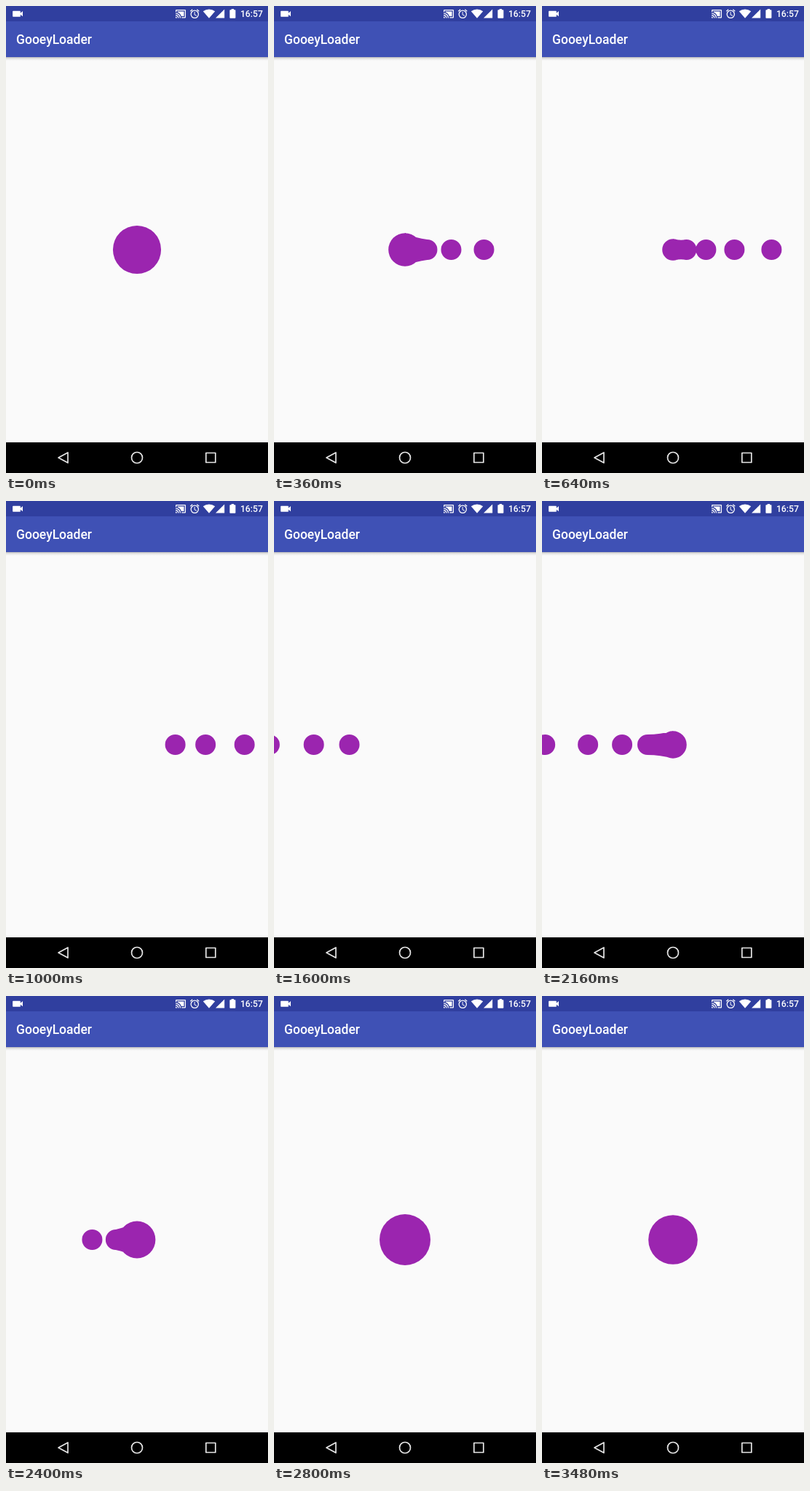
An HTML page that plays this animation: 360x640 px, repeating every 3.52 s.

```html
<!DOCTYPE html>
<html lang="en">
<head>
<meta charset="utf-8">
<title>GooeyLoader</title>
<style>
  html, body { margin: 0; width: 100%; height: 100%; overflow: hidden; background: #fafafa; }
  svg { display: block; width: 360px; height: 640px; }
  text { font-family: Roboto, "Noto Sans", sans-serif; font-weight: 500; fill: #fff; }
</style>
</head>
<body>
<svg viewBox="0 0 360 640">
  <defs>
    <linearGradient id="shade" x1="0" y1="0" x2="0" y2="1">
      <stop offset="0" stop-color="#000" stop-opacity=".26"/>
      <stop offset=".4" stop-color="#000" stop-opacity=".09"/>
      <stop offset="1" stop-color="#000" stop-opacity="0"/>
    </linearGradient>
  </defs>
  <rect width="360" height="640" fill="#fafafa"/>
  <path id="goo" fill="#9b25af"/>

  <rect y="70" width="360" height="5" fill="url(#shade)"/>
  <rect y="21" width="360" height="49" fill="#3f51b5"/>
  <rect width="360" height="21" fill="#303f9f"/>
  <text x="14" y="52" font-size="17.5">GooeyLoader</text>
  <text x="353" y="15.2" font-size="12.25" text-anchor="end">16:57</text>

  <g fill="#fff">
    <path transform="translate(6.8 2.8) scale(.77 .66)" d="M17 10.5V7c0-.55-.45-1-1-1H4c-.55 0-1 .45-1 1v10c0 .55.45 1 1 1h12c.55 0 1-.45 1-1v-3.5l4 4v-11l-4 4z"/>
    <path transform="translate(232.4 3.1) scale(.636)" d="M1 18v3h3c0-1.66-1.34-3-3-3zm0-4v2c2.76 0 5 2.24 5 5h2c0-3.87-3.13-7-7-7zm18-7H5v1.63c3.96 1.28 7.09 4.41 8.37 8.37H19V7zM1 10v2c4.97 0 9 4.03 9 9h2c0-6.08-4.93-11-11-11zm20-7H3c-1.1 0-2 .9-2 2v3h2V5h18v14h-7v2h7c1.1 0 2-.9 2-2V5c0-1.1-.9-2-2-2z"/>
    <path transform="translate(251.6 3) scale(.64)" d="M22 5.72l-4.6-3.86-1.29 1.53 4.6 3.86zM7.88 3.39L6.6 1.86 2 5.71l1.29 1.53zM12.5 8H11v6l4.75 2.85.75-1.23-4-2.37zM12 4a9 9 0 1 0 0 18 9 9 0 0 0 0-18zm0 16a7 7 0 1 1 0-14 7 7 0 0 1 0 14z"/>
    <path d="M279 16.8L270.8 7.2Q274.3 4.4 279 4.4T287.2 7.2Z"/>
    <path d="M288 16.6L300.2 4.4V16.6Z"/>
    <path d="M309.7 5.2V4h3.4v1.2h1.5q.8 0 .8.8v10q0 .8-.8.8h-6.4q-.8 0-.8-.8V6q0-.8.8-.8z"/>
  </g>

  <rect y="598" width="360" height="42"/>
  <g fill="none" stroke="#e6e6e6" stroke-width="1.7" stroke-linejoin="round">
    <path d="M85 611.9V626.1L72 619Z"/>
    <circle cx="180" cy="619" r="7.5"/>
    <rect x="274.8" y="612.5" width="13" height="13"/>
  </g>
</svg>
<script>
const LOOP = 3520, STEP = 40;
const CX = 180, CY = 334, DOT = 14, FULL = 35, COUNT = 8;
const ACCEL = 6;                            // px per squared dot interval
const OUT = { start: -116.7, gap: 112.1 };  // dots leave to the right
const BACK = { start: 1987.7, gap: 108.6 }; // dots arrive from the left
const SHRINK = 735, SHRINK_AT = [-67, 3439];
const goo = document.getElementById('goo');

const mix = (a, b, u) => a + (b - a) * Math.min(1, Math.max(0, u));

const circle = (x, r) =>
  `M${x - r} ${CY}a${r} ${r} 0 1 1 ${2 * r} 0a${r} ${r} 0 1 1 ${-2 * r} 0Z`;

function coreRadius(t) {
  if (t < OUT.start + OUT.gap * (COUNT - 1)) return mix(FULL, DOT, (t - SHRINK_AT[0]) / SHRINK);
  if (t < BACK.start) return 0;
  if (t < SHRINK_AT[1]) return mix(DOT, FULL, (t - BACK.start) / (BACK.gap * (COUNT - 1)));
  return mix(FULL, DOT, (t - SHRINK_AT[1]) / SHRINK);
}

function dotOffsets(t) {
  const list = [];
  for (let i = 0; i < COUNT; i++) {
    const gone = Math.max(0, (t - OUT.start) / OUT.gap - i);
    const left = Math.max(0, (BACK.start - t) / BACK.gap + i);
    list.push(ACCEL * gone * gone, -ACCEL * left * left);
  }
  return list.filter(d => d && Math.abs(d) < CX + DOT);
}

// Bridge between the core and a nearby dot; always wound clockwise.
function neck(d, r) {
  const waist = 0.86 * (r + DOT) / 2, mid = CX + d / 2;
  const [x1, r1, x2, r2] = d > 0 ? [CX, r, CX + d, DOT] : [CX + d, DOT, CX, r];
  return `M${x1} ${CY - r1}Q${mid} ${CY - waist} ${x2} ${CY - r2}` +
    `V${CY + r2}Q${mid} ${CY + waist} ${x1} ${CY + r1}Z`;
}

function draw() {
  const t = Math.floor(performance.now() % LOOP / STEP) * STEP;
  const r = coreRadius(t);
  let path = r ? circle(CX, r) : '';
  for (const d of dotOffsets(t)) {
    path += circle(CX + d, DOT);
    if (r && Math.abs(d) < r + 2 * DOT) path += neck(d, r);
  }
  goo.setAttribute('d', path);
  requestAnimationFrame(draw);
}
draw();
</script>
</body>
</html>
```
